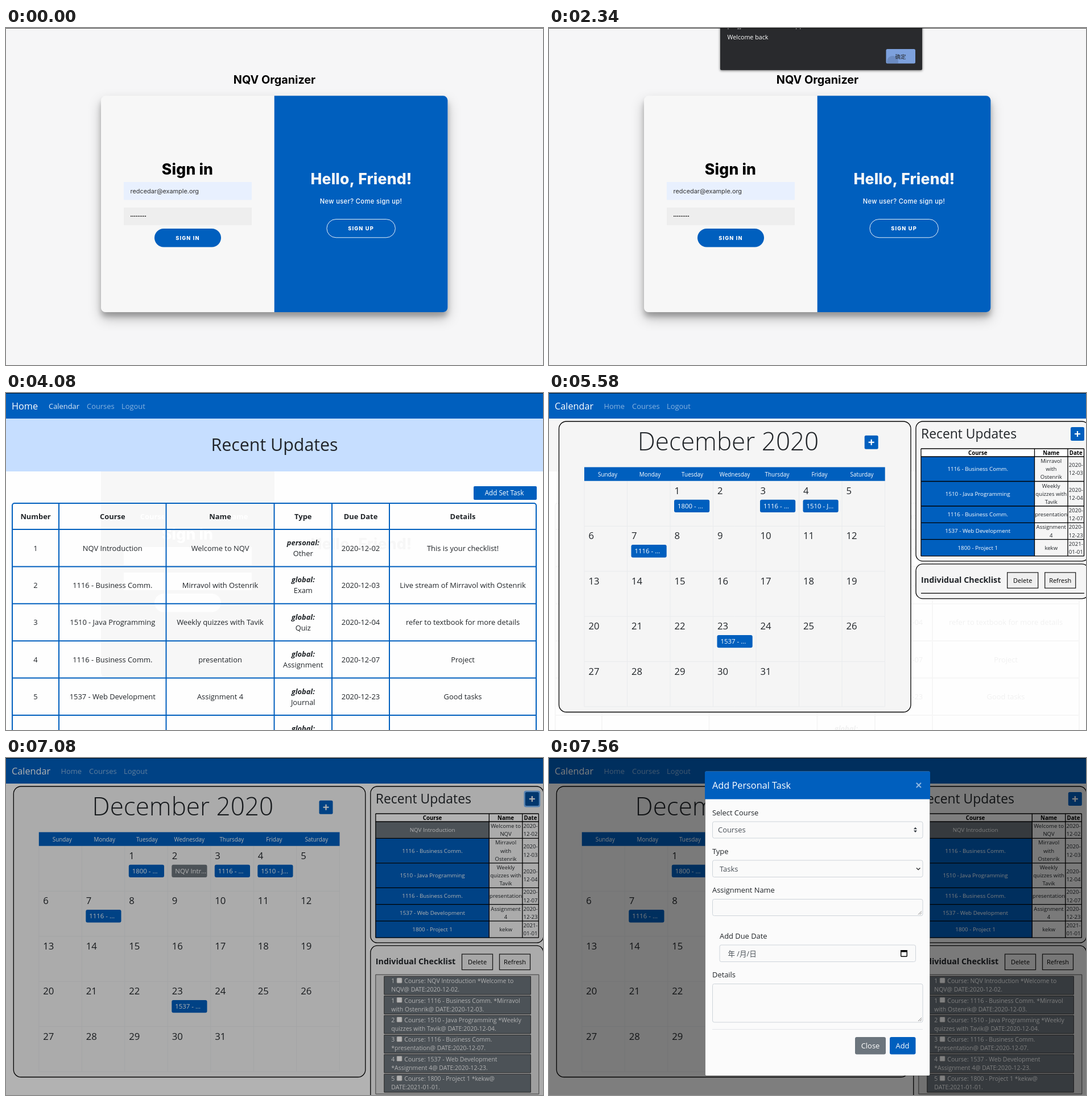
An HTML page with a canvas for the animation above (8000 ms loop, 944x593 px).

```html
<!DOCTYPE html>
<html lang="en">
<head>
<meta charset="utf-8">
<title>Course planner</title>
<style>
html, body { margin: 0; width: 100%; height: 100%; overflow: hidden; background: #f6f6f7; }
canvas { display: block; }
</style>
</head>
<body>
<canvas id="stage" width="944" height="593"></canvas>
<script>
const ctx = document.getElementById('stage').getContext('2d');
const W = 944, H = 593, LOOP = 8000, TICK = 60;
const BLUE = '#005fbe', INK = '#212529', GRAY = '#6c757d', PALE = '#f7f7f7';
const UI = '"Open Sans", "Noto Sans CJK SC", "Noto Sans CJK JP", sans-serif';
const BRAND = 'Inter, sans-serif';

// '|' marks line breaks in the narrow table
const tasks = [
  ['NQV Introduction', 'Welcome to|NQV', 'personal:', 'Other', '2020-12-02', 'This is your checklist!'],
  ['1116 - Business Comm.', 'Mirravol|with|Ostenrik', 'global:', 'Exam', '2020-12-03', 'Live stream of Mirravol with Ostenrik'],
  ['1510 - Java Programming', 'Weekly|quizzes with|Tavik', 'global:', 'Quiz', '2020-12-04', 'refer to textbook for more details'],
  ['1116 - Business Comm.', 'presentation', 'global:', 'Assignment', '2020-12-07', 'Project'],
  ['1537 - Web Development', 'Assignment|4', 'global:', 'Journal', '2020-12-23', 'Good tasks'],
  ['1800 - Project 1', 'kekw', 'global:', 'Project', '2021-01-01', 'kekw']
];
const heads = ['Number', 'Course', 'Name', 'Type', 'Due Date', 'Details'];
const emptyCols = [11, 181, 335.5, 476.5, 602, 790, 946];
const fullCols = [11, 93, 281.5, 471.5, 573, 674, 932];
const wideCols = fullCols.map(x => 11 + (x - 11) * 935 / 921);

const ramp = (t, a, b) => Math.min(1, Math.max(0, (t - a) / (b - a)));

function text(s, x, y, size, color = INK, align = 'left', style = '400', family = UI, gap = 0) {
  ctx.font = `${style} ${size}px ${family}`;
  ctx.letterSpacing = gap + 'px';
  ctx.fillStyle = color;
  ctx.textAlign = align;
  ctx.fillText(s, x, y);
}

const mid = (s, x, y, size, color, style, family, gap) =>
  text(s, x, y, size, color, 'center', style, family, gap);

function rect(x0, y0, x1, y1, fill, r = 0, stroke, lw = 1) {
  ctx.beginPath();
  ctx.roundRect(x0, y0, x1 - x0, y1 - y0, r);
  if (fill) { ctx.fillStyle = fill; ctx.fill(); }
  if (stroke) { ctx.strokeStyle = stroke; ctx.lineWidth = lw; ctx.stroke(); }
}

function line(color, lw, ...pts) {
  ctx.beginPath();
  for (let i = 0; i < pts.length; i += 2) ctx.lineTo(pts[i], pts[i + 1]);
  ctx.strokeStyle = color;
  ctx.lineWidth = lw;
  ctx.stroke();
}

function faded(alpha, draw) {
  if (alpha <= 0) return;
  ctx.save();
  ctx.globalAlpha = alpha;
  draw();
  ctx.restore();
}

function shadowed(dy, blur, alpha, draw) {
  ctx.save();
  ctx.shadowColor = `rgba(0,0,0,${alpha})`;
  ctx.shadowBlur = blur;
  ctx.shadowOffsetY = dy;
  draw();
  ctx.restore();
}

/* ---------- sign-in ---------- */

function login(t) {
  rect(0, 0, W, H, '#f6f6f7');
  mid('NQV Organizer', 472, 98, 19.8, '#000', '700', BRAND);
  const card = () => rect(167, 119.3, 776.4, 500, PALE, 8);
  shadowed(11, 22, .25, card);
  shadowed(8, 8, .22, card);
  rect(471.7, 119.3, 776.4, 500, BLUE, [0, 8, 8, 0]);

  mid('Sign in', 319, 258, 26.5, '#000', '800', BRAND, .2);
  rect(207, 271, 432, 302.5, '#e8f0fe');
  text('redcedar@example.org', 218.5, 290.5, 10.9, '#333', 'left', '400', BRAND);
  rect(207, 316, 432, 347, '#eee');
  for (let i = 0; i < 9; i++) rect(219 + i * 3.15, 330.2, 220.9 + i * 3.15, 332.1, '#111', .9);

  const k = t >= 1140 && t < 1260 ? .95 : 1;
  ctx.save();
  ctx.translate(319.5, 369.2);
  ctx.scale(k, k);
  rect(-58.5, -16.2, 58.5, 16.2, BLUE, 16.2);
  mid('SIGN IN', 0, 3.6, 9.2, '#fff', '800', BRAND, 1.2);
  ctx.restore();

  mid('Hello, Friend!', 624.5, 274.5, 26.5, PALE, '800', BRAND, .2);
  mid('New user? Come sign up!', 624, 309, 11.1, '#fff', '500', BRAND, .4);
  rect(563.9, 336.5, 684.4, 368.8, null, 16.2, '#fff', .9);
  mid('SIGN UP', 624, 356.2, 9.2, '#fff', '800', BRAND, 1.2);
}

function alertBox(t) {
  const show = ramp(t, 1620, 1860) * (1 - ramp(t, 2340, 2580));
  faded(show, () => {
    shadowed(1, 4, .6, () => rect(301, -20, 656, 74, '#292a2d', 2));
    text('projyclass-demo.webapp', 313.5, -1, 11.5, '#fff');
    text('Welcome back', 313.5, 20, 10.7, '#fff');
    const hit = t >= 2340;
    rect(592.5, 37, 644, 62.5, hit ? '#7da1dd' : '#8ab4f8', 2.5);
    if (hit) {
      ctx.save();
      ctx.beginPath();
      ctx.rect(592.5, 37, 51.5, 25.5);
      ctx.clip();
      ctx.beginPath();
      ctx.arc(604, 59, 10 + (t - 2340) / 6, 0, 7);
      ctx.fillStyle = 'rgba(70,90,130,.3)';
      ctx.fill();
      ctx.restore();
    }
    mid('确定', 618, 53.5, 9.5, '#25282d');
  });
}

/* ---------- shared chrome ---------- */

function nav(title, links, gap, lit) {
  rect(0, 0, W, 45, BLUE);
  text(title, 10, 29, 16.3, '#fff');
  links.forEach((s, i) => text(s, gap[i], 28, 12.9, i === lit ? 'rgba(255,255,255,.85)' : 'rgba(255,255,255,.52)'));
}

function status(width, alpha) {
  faded(alpha, () => {
    rect(0, 577, width, H, '#424345', [0, 3, 0, 0]);
    text('正在等待 www.googleapis.com 的响应...', 0, 590, 9.4, '#fff');
  });
}

/* ---------- home ---------- */

function taskTable(cols, list, color, ink) {
  const bottom = 240 + list.length * 65.4;
  rect(cols[0], 194, cols[6], bottom, null, 4, color, 2);
  cols.slice(1, 6).forEach(x => line(color, 2, x, 194, x, bottom));
  list.forEach((_, i) => line(color, 2, cols[0], 240 + i * 65.4, cols[6], 240 + i * 65.4));
  const at = i => (cols[i] + cols[i + 1]) / 2;
  heads.forEach((s, i) => mid(s, at(i), 222, 12.9, ink, '700'));
  list.forEach(([course, name, scope, kind, due, note], i) => {
    const y = 277.5 + i * 65.4;
    [i + 1, course, name.replaceAll('|', ' '), null, due, note]
      .forEach((s, c) => s && mid(s, at(c), y, 12.9, ink));
    mid(scope, at(3), y - 9.5, 12.9, ink, 'italic 700');
    mid(kind, at(3), y + 9.5, 12.9, ink);
  });
}

function home(t) {
  rect(0, 0, W, H, '#fefefe');
  // faint remains of the sign-in card
  rect(167, 138, 472, 500, PALE, [0, 0, 0, 8]);
  mid('Sign in', 319, 258, 26.5, '#fff', '800', BRAND, .2);
  rect(207, 271, 432, 302.5, '#fefefe');
  rect(207, 316, 432, 347, '#fefefe');
  rect(261, 353, 378, 385.5, '#fefefe', 16.2);
  mid('Hello, Friend!', 624.5, 274.5, 26.5, PALE, '800', BRAND, .2);

  const settled = t >= 3480;
  const shift = settled ? 0 : 13.4;
  const lit = t < 4080 ? -1 : t >= 4200 && t < 4260 ? 1 : 0;
  nav('Home', ['Calendar', 'Courses', 'Logout'], [75, 142, 203], lit);
  rect(0, 45, W, 138, '#c6deff');
  mid('Recent Updates', 472 + shift / 2, 102, 30.4);
  rect(822 + shift, 164, 933 + shift, 188, BLUE, 2);
  mid('Add Set Task', 876 + shift, 180, 11.7, '#fff');

  if (settled) {
    mid('Course', 258, 222, 12.9, '#fff', '700');
    mid('Name', 406, 222, 12.9, '#fff', '700');
    taskTable(fullCols, tasks, BLUE, INK);
  } else if (t >= 3300) {
    taskTable(wideCols, tasks.slice(1), BLUE, INK);
  } else {
    taskTable(emptyCols, [], BLUE, INK);
  }
  status(316, 1 - ramp(t, 2960, 3120));
  status(221, ramp(t, 4500, 4620));
}

/* ---------- calendar ---------- */

function plus(x, y, fill, ring) {
  if (ring) rect(x - 2.4, y - 2.4, x + 26.4, y + 26.4, 'rgba(38,143,255,.6)', 4);
  rect(x, y, x + 24, y + 24, fill, 2.5);
  line('#fff', 2.2, x + 7, y + 12, x + 17, y + 12);
  line('#fff', 2.2, x + 12, y + 7, x + 12, y + 17);
}

function month(filled, personal) {
  rect(17.5, 50, 636, 561.5, '#f5f5f5', 13, '#000', 1.3);
  mid('December 2020', 315, 101, 44, INK, '300');
  plus(554.7, 74.7, BLUE);
  const x = c => 62 + c * 75.5, y = r => 155 + r * 79.4;
  for (let i = 0; i < 8; i++) line('#e9ebed', 1, x(i), y(0), x(i), y(5));
  for (let i = 1; i < 6; i++) line('#e9ebed', 1, x(0), y(i), x(7), y(i));
  rect(62, 130.6, 590.7, 154.7, BLUE);
  ['Sun', 'Mon', 'Tues', 'Wednes', 'Thurs', 'Fri', 'Satur']
    .forEach((s, i) => mid(s + 'day', 103 + i * 74.5, 146.5, 9.9, '#fff'));

  const events = filled ? { 1: '1800 - ...', 3: '1116 - ...', 4: '1510 - J...', 7: '1116 - ...', 23: '1537 - ...' } : {};
  if (personal) events[2] = 'NQV Intr...';
  for (let d = 1; d <= 31; d++) {
    const cx = x((d + 1) % 7), cy = y(Math.floor((d + 1) / 7));
    text(d, cx + 7.5, cy + 23, 16.7);
    if (!events[d]) continue;
    rect(cx + 7, cy + 32.7, cx + 69.2, cy + 55, d === 2 ? GRAY : BLUE, 3);
    text(events[d], cx + 13, cy + 48, 11.4, '#fff');
  }
}

function updates(list, hover, ring) {
  const height = r => Math.max(2, r[1].split('|').length) * 14.2 + .9;
  const bottom = list.reduce((sum, r) => sum + height(r), 112);
  rect(645, 50, 949, bottom + 9, '#f5f5f5', 12, '#000', 1.3);
  text('Recent Updates', 654, 80, 22.9);
  plus(917, 60, hover ? '#004f9e' : BLUE, ring);
  const cols = [654, 853.5, 912, 940.5];
  const at = i => (cols[i] + cols[i + 1]) / 2;
  rect(654, 98, 940.5, 112, '#fff');
  ['Course', 'Name', 'Date'].forEach((s, i) => mid(s, at(i), 108.7, 9.7, '#000', '700'));
  line('#000', 1.3, 654, 98, 940.5, 98);
  let y = 112;
  for (const r of list) {
    const h = height(r), c = y + h / 2 + 3.5;
    const stack = (lines, col) => lines.forEach((s, i) =>
      mid(s, at(col), c + (i - (lines.length - 1) / 2) * 14.2, 9.6));
    rect(654, y, 853.5, y + h, r[2] === 'personal:' ? GRAY : BLUE);
    mid(r[0], at(0), c, 9.8, '#fff');
    stack(r[1].split('|'), 1);
    stack([r[4].slice(0, 5), r[4].slice(5)], 2);
    line('#000', 1.3, 654, y, 940.5, y);
    y += h;
  }
  line('#000', 1.3, 654, y, 940.5, y);
  cols.forEach(x => line('#000', 1.3, x, 98, x, y));
  return bottom + 14;
}

function checklist(top, open) {
  rect(645, top, 949, open ? 640 : top + 61, '#f5f5f5', 12, '#000', 1.3);
  text('Individual Checklist', 654, top + 33, 14.3, INK, 'left', '700');
  [['Delete', 805.7], ['Refresh', 871.7]].forEach(([s, x]) => {
    rect(x, top + 15, x + 54, top + 42.5, '#efefef', 0, '#222', 1.3);
    mid(s, x + 27, top + 33, 11, '#000');
  });
  if (!open) return line('#000', 1.3, 654, top + 51.5, 941, top + 51.5);

  rect(654, top + 51, 941, top + 261, '#e4e4e4', 0, '#555', 1);
  tasks.forEach(([course, name, , , due], i) => {
    const y = top + 54 + i * 34.4;
    rect(669, y, 926.5, y + 32, GRAY, 0, '#333', 1);
    text(Math.max(1, i), 681.5, y + 12, 10.5, '#fff');
    rect(691, y + 2.5, 700.5, y + 12, '#fff', 1.5, '#888', .8);
    let x = 704.5, row = 0;
    for (const word of `Course: ${course} *${name.replaceAll('|', ' ')}@ DATE:${due}.`.split(' ')) {
      const w = ctx.measureText(word).width;
      if (!row && x + w > 920) { row = 1; x = 681.5; }
      text(word, x, y + 12 + row * 15, 10.5, '#fff');
      x += ctx.measureText(word + ' ').width;
    }
  });
}

function calendar(t) {
  rect(0, 0, W, H, '#fefefe');
  const filled = t >= 5340, personal = t >= 5760, open = t >= 5820;
  if (!open) {
    // faint remains of the home table
    rect(0, 45, W, 138, '#f5f5f5');
    taskTable(fullCols, tasks, '#f6f6f6', '#f1f1f1');
  }
  nav('Calendar', ['Home', 'Courses', 'Logout'], [96.5, 146, 207], -1);
  ctx.save();
  // the scrollbar narrows the page once the checklist is open
  if (open) ctx.translate(-4.2, 0);
  month(filled, personal);
  const list = filled ? tasks.slice(personal ? 0 : 1) : [];
  checklist(updates(list, t >= 6780 && t < 7200, t >= 6900 && t < 7200), open);
  ctx.restore();
  status(221, 1 - ramp(t, 5400, 5580));
}

/* ---------- add-task dialog ---------- */

function field(x0, y0, x1, y1, grip) {
  rect(x0, y0, x1, y1, '#fafafa', 3, '#ced4da', 1);
  if (!grip) return;
  line('#666', .8, x1 - 8, y1 - 2, x1 - 2, y1 - 8);
  line('#666', .8, x1 - 5, y1 - 2, x1 - 2, y1 - 5);
}

function triangle(x, y, dir) {
  ctx.beginPath();
  ctx.moveTo(x - 3, y);
  ctx.lineTo(x + 3, y);
  ctx.lineTo(x, y + 3.6 * dir);
  ctx.fillStyle = '#343a40';
  ctx.fill();
}

function modal(t) {
  const p = ramp(t, 7140, 7560);
  faded(ramp(t, 7140, 7320), () => {
    ctx.translate(0, -40 * (1 - p) ** 2);
    rect(274.5, 23.5, 669.5, 559, '#fbfbfb', 2, 'rgba(0,0,0,.3)', 1);
    rect(274, 23.5, 670, 72.5, BLUE, [2, 2, 0, 0]);
    text('Add Personal Task', 287, 54, 16.3, '#fff');
    line('#8fb8e2', 2, 645.8, 43.8, 654, 52);
    line('#8fb8e2', 2, 654, 43.8, 645.8, 52);

    [['Select Course', 287, 101], ['Type', 287, 168.5], ['Assignment Name', 287, 237],
     ['Add Due Date', 300, 318], ['Details', 287, 386]]
      .forEach(([s, x, y]) => text(s, x, y, 12.9));

    field(287.5, 112, 657, 141);
    text('Courses', 297, 131, 12.9, '#495057');
    triangle(644, 125.3, -1);
    triangle(644, 127.5, 1);
    field(287.5, 180, 657, 209.5);
    text('Tasks', 300, 199.5, 12.9, '#495057');
    line('#222', 1.3, 646, 193.5, 649.2, 196.7, 652.4, 193.5);
    field(287.5, 248.5, 657, 277.5, true);
    field(300, 329, 644.5, 358.5);
    text('年 /月/日', 314.5, 348.5, 12.6, '#495057');
    rect(618.7, 339, 629.3, 349.3, null, 1, '#000', 1.4);
    rect(618, 338, 630, 341.5, '#000');
    field(287.5, 397.5, 657, 465, true);

    line('#e3e6e9', 1, 287, 477.5, 657, 477.5);
    rect(538, 491, 592, 521.5, GRAY, 3);
    mid('Close', 565, 511, 12.9, '#fff');
    rect(599, 491, 644.5, 521.5, BLUE, 3);
    mid('Add', 621.5, 511, 12.9, '#fff');
  });
}

function frame(now) {
  const t = Math.floor(now % LOOP / TICK) * TICK;
  if (t < 2640) {
    login(t);
    alertBox(t);
  } else if (t < 5040) {
    home(t);
  } else {
    calendar(t);
    faded(.5 * ramp(t, 6990, 7140), () => rect(0, 0, W, H, '#000'));
    modal(t);
  }
  rect(0, 0, W, 1, 'rgba(0,0,0,.7)');
}

const start = performance.now();
function loop() {
  frame(performance.now() - start);
  requestAnimationFrame(loop);
}
loop();
</script>
</body>
</html>
```
